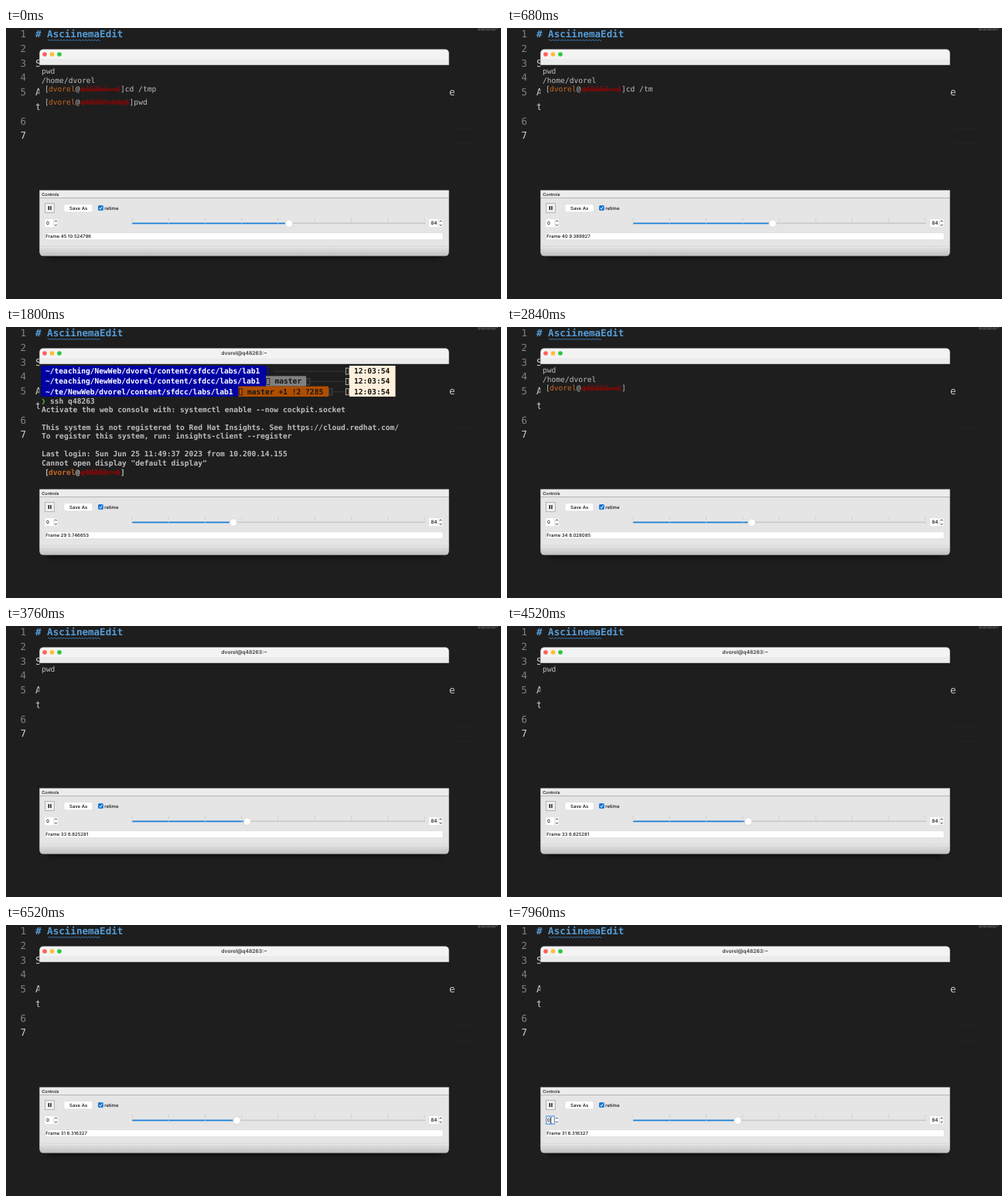
An HTML page for the animation above (8 s loop, 640x350 px).

```html
<!DOCTYPE html>
<html lang="en">
<head>
<meta charset="utf-8">
<title>Terminal recording editor</title>
<style>
html, body { margin: 0; width: 100%; height: 100%; overflow: hidden; background: #1e1e1e; }
svg { display: block; width: 640px; height: 350px; }
text { white-space: pre; text-rendering: geometricPrecision; }
.editor { font: 12.55px "DejaVu Sans Mono", monospace; fill: #c8c8c8; }
.term { font: 9.6px "DejaVu Sans Mono", monospace; }
.bold { font-weight: bold; }
.ui { font: 500 6px Inter, sans-serif; fill: #111; }
.focus { animation: focus 8s step-end infinite; }
@keyframes focus { 0% { opacity: 0; } 92.5% { opacity: 1; } }
</style>
</head>
<body>
<svg viewBox="0 0 640 350">
  <defs>
    <linearGradient id="status" x2="0" y2="1">
      <stop stop-color="#dedede"/><stop offset="1" stop-color="#bebebe"/>
    </linearGradient>
    <clipPath id="frame"><rect x="43.3" y="27.4" width="529.4" height="267.2" rx="5"/></clipPath>
    <filter id="soft" x="-10%" y="-10%" width="120%" height="125%"><feGaussianBlur stdDeviation="3.5"/></filter>
  </defs>
  <rect width="640" height="350" fill="#1e1e1e"/>
  <g id="editor" class="editor">
    <text x="38" y="12" class="bold" style="fill:#569cd6"># AsciinemaEdit</text>
    <text x="38" y="49.5">S</text>
    <text x="38" y="87">A</text>
    <text x="573" y="87">e</text>
    <text x="38" y="105.7">t</text>
    <path id="squiggle" fill="none" stroke="#3f86c4" stroke-width=".8"/>
    <path d="M577 130h31M577 149h31" stroke="#282828" stroke-width=".8"/>
    <path d="M610 .8h26M610 2.6h23" stroke="#777" stroke-width=".8" stroke-dasharray="3 .7 1.6 .6"/>
  </g>
  <rect x="52" y="36" width="512" height="261" rx="6" filter="url(#soft)" opacity=".65"/>
  <g clip-path="url(#frame)">
    <rect x="43" y="27" width="530" height="268" fill="#1e1e1e"/>
    <rect x="43" y="27" width="530" height="14" fill="#f3f3f3"/>
    <rect x="43" y="41" width="530" height="6.8" fill="#ececec"/>
    <path d="M43 41h530" stroke="#dcdcdc" stroke-width=".5"/>
    <circle cx="50" cy="34" r="2.8" fill="#ff5f57"/>
    <circle cx="59.5" cy="34" r="2.8" fill="#febc2e"/>
    <circle cx="69" cy="34" r="2.8" fill="#28c840"/>
    <rect x="43" y="209.5" width="530" height="10" fill="#ececec"/>
    <rect x="43" y="219.5" width="530" height="65" fill="#e5e5e5"/>
    <path d="M43 282h530" stroke="#cccccc" stroke-width=".6"/>
    <rect x="43" y="284" width="530" height="11" fill="url(#status)"/>
  </g>
  <text id="title" class="ui" x="308" y="36.3" text-anchor="middle" style="font-weight:700;fill:#4b4b4b;font-size:6.6px"></text>
  <g id="term" class="term"></g>
  <g class="ui">
    <text x="46.3" y="217.2" style="font-size:5.5px">Controls</text>
    <rect x="50.5" y="226.5" width="12" height="12" fill="#efefef" stroke="#a8a8a8" stroke-width=".8"/>
    <path d="M55.3 230v5M57.9 230v5" stroke="#111" stroke-width="1.4"/>
    <rect x="75" y="227.4" width="37" height="10.4" rx="2.2" fill="#fff" stroke="#d0d0d0" stroke-width=".5"/>
    <text x="82" y="234.8">Save As</text>
    <rect x="119" y="229" width="6.8" height="6.8" rx="1.5" fill="#1474d4"/>
    <path d="M120.6 232.6l1.4 1.6 2.3-3.6" fill="none" stroke="#fff" stroke-width="1"/>
    <text x="127.3" y="234.8">retime</text>
    <rect x="50.5" y="247" width="10.5" height="10" fill="#fff"/>
    <rect x="547" y="247" width="11.5" height="10" fill="#fff"/>
    <text x="52" y="254.2">0</text>
    <text x="549.2" y="254.2" style="font-size:6.4px">84</text>
    <g id="steppers" fill="none" stroke="#222" stroke-width=".9"></g>
    <path d="M163 252.3h379" stroke="#c8c8c8" stroke-width="1.5"/>
    <path id="fill" stroke="#1f82dc" stroke-width="1.8"/>
    <path id="ticks" stroke="#cacaca" stroke-width=".8"/>
    <circle id="knob" cy="252.5" r="4.8" fill="#fff" stroke="#c9c9c9" stroke-width=".6"/>
    <rect x="50.5" y="264.5" width="514.5" height="9" fill="#fff" stroke="#d2d2d2" stroke-width=".5"/>
    <text id="label" x="51.3" y="271.2"></text>
  </g>
  <g class="focus">
    <rect x="50.8" y="247" width="10.6" height="10" fill="none" stroke="#6fa6dc" stroke-width="1.5"/>
    <path d="M55.2 248.6q1.4 0 1.4 1v5.5q0 1 -1.4 1M58 248.6q-1.4 0 -1.4 1v5.5q0 1 1.4 1" fill="none" stroke="#222" stroke-width=".7"/>
  </g>
</svg>
<script>
const $ = id => document.getElementById(id);
const USER = "dvorel", HOST = "q48263", CHAR = 5.78;

const text = (x, y, str, fill = "#bdbdbd", cls = "") =>
  `<text x="${x}" y="${y}" class="${cls}" style="fill:${fill}">${str}</text>`;
const box = (x, y, w, h, fill) =>
  `<rect x="${x}" y="${y}" width="${w}" height="${h}" fill="${fill}"/>`;
const missing = (x, y, color) =>
  `<rect x="${x + .8}" y="${y - 7}" width="4" height="8" fill="none" stroke="${color}" stroke-width=".8"/>`;

function prompt(y, place, typed, cls) {
  const host = HOST + place, end = 96 + host.length * CHAR;
  return text(50, y, "[", undefined, cls) + text(55, y, USER, "#c8641e", cls) +
    text(89.7, y, "@", undefined, cls) + text(96, y, host, "#8c0b0b", cls) +
    `<path d="M97 ${y - 2.7}H${end - 1}" stroke="#780808" stroke-width="3.4" opacity=".75"/>` +
    text(end, y, "]" + typed, undefined, cls);
}

function loginScreen() {
  const tail = `/NewWeb/${USER}/content/sfdcc/labs/lab1`;
  const rowHeight = 13.3;
  const rows = [
    ["~/teaching", 336, "", "", 340],
    ["~/teaching", 336, "#808080", "master", 388],
    ["~/te", 300.5, "#b04e00", "master +1 !2 ?285", 417]
  ];
  let out = box(444, 50, 59.5, 3 * rowHeight, "#fff0dc");
  rows.forEach(([head, edge, color, branch, end], i) => {
    const top = 50 + i * rowHeight, y = top + 10.1;
    out += box(45.3, top, edge - 45.3, rowHeight, "#0000a6") + text(51, y, head + tail, "#fff", "bold");
    if (color) {
      out += box(edge, top, end - edge, rowHeight, color) + missing(edge, y, "#151515") +
        text(edge + 11.5, y, branch, "#161616", "bold") + missing(end, y, "#555");
    } else out += missing(edge, y, "#0000a6");
    out += `<path d="M${end + 6} ${y - 3}H438" stroke="#555" stroke-width=".7" stroke-dasharray="1 .6"/>` +
      missing(438.5, y, "#d8ccb8") + text(450, y, "12:03:54", "#111", "bold");
  });
  out += text(45.5, 98.5, "❯", "#4fb83a", "bold");
  const lines = [
    [57, 98.5, "ssh " + HOST],
    [46, 109.7, "Activate the web console with: systemctl enable --now cockpit.socket"],
    [46, 132.6, "This system is not registered to Red Hat Insights. See https://cloud.redhat.com/"],
    [46, 144.3, "To register this system, run: insights-client --register"],
    [46, 167.4, "Last login: Sun Jun 25 11:49:37 2023 from 10.200.14.155"],
    [46, 178.8, 'Cannot open display "default display"']
  ];
  for (const [x, y, str] of lines) out += text(x, y, str, "#bdbdbd", "bold");
  return out + prompt(190.5, ":~$", "", "bold");
}

function screen(n) {
  if (n < 30) return loginScreen();
  if (n < 34) return text(46, 59.3, "pwd".slice(0, n - 30));
  let out = text(46, 59.3, "pwd") + text(46, 70.9, "/home/" + USER) +
    prompt(82.4, ":~$", "cd /tmp".slice(0, n - 34));
  if (n > 41) out += prompt(98.8, ":tmp$", "pwd".slice(0, n - 42));
  if (n > 45) out += text(46, 110.4, "/tmp") + prompt(122, ":tmp$", "");
  return out;
}

const stamps = { 29: 5.746653, 31: 6.316327, 32: 6.570804, 33: 6.825281 };
const stamp = n => (stamps[n] ?? 8.028085 + (n - 34) * 2.496711 / 11).toFixed(6);

// Slider position over time: [ms, position], linear in between.
const drag = [
  [0, 45], [60, 45], [340, 51], [460, 50], [840, 33], [1000, 29], [1900, 29], [1960, 30],
  [2300, 30], [2780, 34], [3220, 34], [3400, 33], [3760, 33], [3900, 34], [4120, 34],
  [4280, 33], [4640, 33], [4780, 32], [4920, 32], [5040, 31], [5100, 31], [5200, 30], [8000, 30]
];

function positionAt(t) {
  const i = drag.findIndex(key => key[0] > t);
  const [t0, a] = drag[i - 1], [t1, b] = drag[i];
  return Math.round(a + (b - a) * (t - t0) / (t1 - t0));
}

function show(n) {
  const x = 163.4 + n * 4.5, shown = n === 30 ? 31 : n;
  $("term").innerHTML = screen(n);
  $("title").textContent = n < 34 ? `${USER}@${HOST}:~` : "";
  $("label").textContent = `Frame ${shown} ${stamp(shown)}`;
  $("knob").setAttribute("cx", x);
  $("fill").setAttribute("d", `M163 252.3H${x}`);
}

for (let i = 1; i <= 7; i++) {
  const active = i === 7 ? "#d0d0d0" : "#7d8288";
  $("editor").innerHTML += text(18.5, 12 + (i > 5 ? i : i - 1) * 18.75, i, active);
}
$("squiggle").setAttribute("d", "M54 15.8" + "q1 -1.6 2 0t2 0".repeat(17));
$("ticks").setAttribute("d", Array.from({ length: 9 }, (_, i) => `M${163 + i * 47.25} 245v4.5m0 1.8v2`).join(""));
$("steppers").innerHTML = [64.5, 562].map(x =>
  `<rect x="${x - 3}" y="246.8" width="6" height="10.4" rx="1.8" fill="#fff" stroke="#d4d4d4" stroke-width=".4"/>` +
  `<path d="M${x - 1.6} 250.3l1.6 -1.7 1.6 1.7M${x - 1.6} 253.7l1.6 1.7 1.6 -1.7"/>`).join("");

let current;
function tick(now) {
  const n = positionAt(now % 8000);
  if (n !== current) show(current = n);
  requestAnimationFrame(tick);
}
show(current = 45);
requestAnimationFrame(tick);
</script>
</body>
</html>
```
